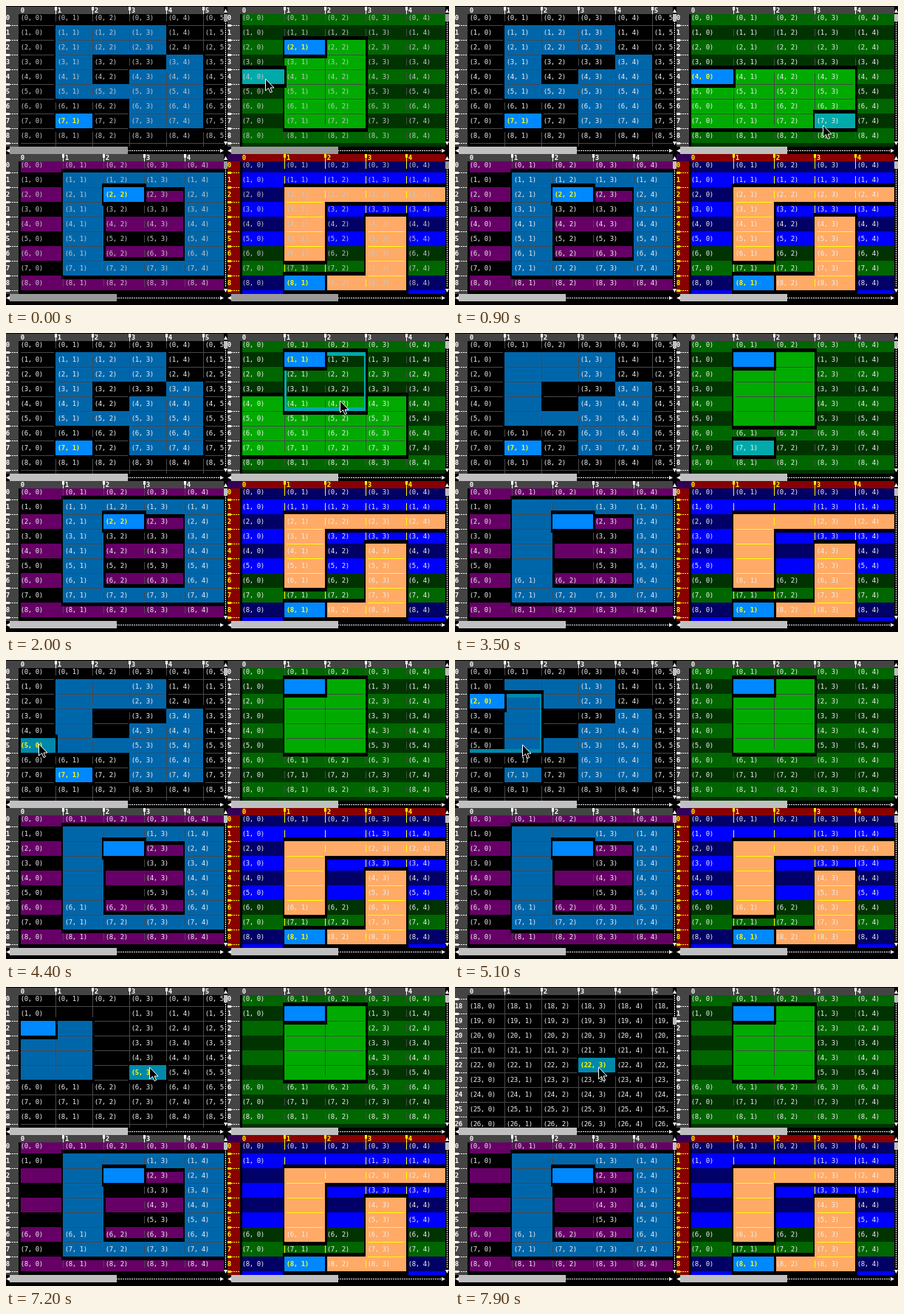
An HTML page with a canvas for the animation above (8000 ms loop, 600 by 406 pixels).

```html
<!DOCTYPE html>
<html lang="en">
<head>
<meta charset="utf-8">
<title>Four tables</title>
<style>
  html, body { margin: 0; width: 100%; height: 100%; overflow: hidden; background: #000; }
  canvas { display: block; width: 600px; height: 406px; }
</style>
</head>
<body>
<canvas id="stage" width="600" height="406"></canvas>
<script>
const g = document.getElementById('stage').getContext('2d');
const LOOP = 8000, STEP = 100;
const FONT = '9px "DejaVu Sans Mono", monospace';
const WHITE = '#fff', YELLOW = '#ffff00', CURRENT = '#0088ff';

const between = (v, lo, hi) => v >= lo && v <= hi;
const block = (a, b) => (r, c) => between(r, a[0], b[0]) && between(c, a[1], b[1]);
const alternate = (even, odd) => r => r % 2 ? odd : even;

// Mouse moves: start, end, goal
const moves = [
  [100, 200, 350, 97], [300, 700, 498, 162], [900, 1700, 402, 37],
  [1700, 2000, 452, 92], [2000, 2300, 487, 140], [2300, 2400, 470, 118],
  [2600, 2600, 400, 156], [4000, 4000, 110, 122], [4000, 4400, 44, 114],
  [4500, 4800, 42, 56], [4900, 5200, 116, 145], [5200, 5300, 109, 119],
  [7000, 7200, 194, 109]
];

function mouseAt(t) {
  let x = 351, y = 99;
  for (const [start, end, goalX, goalY] of moves) {
    if (t < start) break;
    const k = start === end ? 1 : Math.min(1, (t - start) / (end - start));
    x += (goalX - x) * k;
    y += (goalY - y) * k;
  }
  return { x: Math.round(x), y: Math.round(y), shown: t < 2600 || t >= 4000 };
}

// Drags select the block a to b; "cut" empties it in all tables
const gray = { head: '#444', corner: '#444', ink: WHITE, line: '#484848' };
const wide = { first: 60, width: 55, cols: 5, thumb: 145, drags: [] };
const tables = [
  { ...gray, x: 0, y: 1, first: 50, width: 50, cols: 6, thumb: 160,
    row: () => '#000000', selected: '#0066aa', hover: '#0088aa', hoverBold: true,
    current: [7, 1],
    shape: (r, c) => between(r, 1, 7) && between(c, 1, 4) &&
      (r <= 2 && c <= 3 || c === 1 && r !== 6 || r === 5 || c >= 3 && r >= 4 || c === 4 && r === 3),
    drags: [{ press: 5000, release: 5600, a: [2, 0], b: [5, 1], cut: 6400 }] },
  { ...gray, ...wide, x: 300, y: 1,
    row: alternate('#006600', '#003300'), selected: '#00aa00', hover: '#00aaaa',
    current: [2, 1],
    shape: block([2, 1], [7, 2]),
    drags: [{ press: 400, release: 900, a: [4, 0], b: [7, 3] },
            { press: 1800, release: 2600, a: [1, 1], b: [5, 2], cut: 3400 }] },
  { ...gray, ...wide, x: 0, y: 201,
    row: alternate('#660066', '#000000'), selected: '#0066aa',
    current: [2, 2],
    shape: (r, c) => between(r, 1, 7) && c >= 1 && !(between(r, 2, 6) && between(c, 2, 3)) },
  { ...wide, x: 300, y: 201, head: '#880000', corner: '#330055', ink: YELLOW, line: YELLOW,
    row: r => between(r, 6, 7) ? alternate('#003300', '#006600')(r) : alternate('#000066', '#0000ff')(r),
    selected: '#ffaa66',
    current: [8, 1],
    shape: (r, c) => r === 2 && c >= 1 || c === 1 && between(r, 2, 6) ||
      c === 3 && between(r, 4, 8) || r === 8 && between(c, 1, 3) }
];
const cuts = tables.flatMap(tb => tb.drags).filter(d => d.cut);

function rect(color, x, y, w, h) {
  g.fillStyle = color;
  g.fillRect(x, y, w, h);
}

function clipTo(x, y, w, h, draw) {
  g.save();
  g.beginPath();
  g.rect(x, y, w, h);
  g.clip();
  draw();
  g.restore();
}

// Terminal text: one glyph for every 5 by 10 character cell
function text(str, x, y, color, bold) {
  g.font = (bold ? 'bold ' : '') + FONT;
  g.fillStyle = color;
  [...str].forEach((ch, i) => g.fillText(ch, x + i * 5 + 2.5, y + 8));
}

function poly(color, points) {
  g.fillStyle = color;
  g.beginPath();
  points.forEach(p => g.lineTo(...p));
  g.closePath();
  g.fill();
}

const colX = (tb, c) => tb.x + 17 + (c ? tb.first + (c - 1) * tb.width : 0);
const rowY = (tb, r, scroll) => tb.y + 5 + r * 20 - scroll;

function cellUnder(tb, mouse, scroll) {
  const { x, y } = mouse;
  if (!between(x, tb.x + 20, tb.x + 294) || !between(y, tb.y + 10, tb.y + 189)) return null;
  let col = 0;
  while (colX(tb, col + 1) <= x) col++;
  return [Math.floor((y - rowY(tb, 0, scroll)) / 20), col];
}

function drawCells(tb, t, scroll, mouse, ink) {
  const box = (a, b = a) => {
    const x = colX(tb, a[1]), y = rowY(tb, a[0], scroll);
    return [x, y, colX(tb, b[1] + 1) - x, (b[0] - a[0] + 1) * 20];
  };
  const rim = (a, b) => {
    const [x, y, w, h] = box(a, b);
    rect('#000', x - 2, y - 5, w + 5, h + 10);
  };
  const fill = (color, a) => rect(color, ...box(a));

  const pressed = tb.drags.filter(d => t >= d.press).pop();
  const done = tb.drags.filter(d => t >= d.release).pop();
  const dragging = pressed && pressed !== done;
  const current = pressed ? pressed.a : tb.current;
  const chosen = done ? block(done.a, done.b) : tb.shape;
  const color = (r, c) => chosen(r, c) ? tb.selected : tb.row(r);
  const over = cellUnder(tb, mouse, scroll);

  const first = Math.floor(scroll / 20);
  const cells = [];
  for (let r = first; r <= first + 10; r++) {
    rect(tb.row(r), tb.x + 17, rowY(tb, r, scroll), 283, 20);
    for (let c = 0; c < tb.cols; c++) cells.push([r, c]);
  }
  const picked = cells.filter(([r, c]) => chosen(r, c));
  picked.forEach(p => rim(p));
  picked.forEach(p => fill(tb.selected, p));

  // Grid lines run only between cells of one colour
  for (const [r, c] of cells) {
    const [x, y, w] = box([r, c]), own = color(r, c);
    const up = r > 0 && color(r - 1, c) === own;
    const side = c > 0 && color(r, c - 1) === own;
    if (up) rect(tb.line, x + 3, y, w - 5, 1);
    if (side) rect(tb.line, x, y + 5, 1, 10);
    if (up && side && color(r - 1, c - 1) === own) {
      rect(tb.line, x - 2, y, 5, 1);
      rect(tb.line, x, y - 5, 1, 10);
    }
  }

  if (dragging && over) {
    const end = over.map((v, i) => Math.max(v, current[i]));
    const [x, y, w, h] = box(current, end);
    const frame = (shade, fx, fy, fw, fh, l, r) => {
      rect(shade, fx, fy, fw, 5);
      rect(shade, fx, fy + fh - 5, fw, 5);
      rect(shade, fx, fy, l, fh);
      rect(shade, fx + fw - r, fy, r, fh);
    };
    frame('#000', x - 2, y - 5, w + 5, h + 10, 2, 3);
    frame(tb.hover, x, y, w, h, 3, 2);
  }
  rim(current);
  fill(CURRENT, current);
  const hovered = dragging ? null : over;
  if (hovered) {
    rim(hovered);
    fill(tb.hover, hovered);
  }

  for (const [r, c] of cells) {
    if (cuts.some(d => t >= d.cut && block(d.a, d.b)(r, c))) continue;
    const is = p => p && p[0] === r && p[1] === c;
    const bold = is(hovered) ? tb.hoverBold : is(current);
    const [x, y] = box([r, c]);
    text(`(${r}, ${c})`, x + 3, y + 5, bold ? YELLOW : ink, bold);
  }
}

function drawHeaders(tb, scroll) {
  const { x, y } = tb;
  rect(tb.head, x, y, 295, 10);
  rect(tb.corner, x, y, 20, 10);
  for (let c = 0; c < tb.cols; c++) {
    const cx = colX(tb, c);
    text(String(c), cx + 3, y, tb.ink, true);
    if (!c) continue;
    rect(tb.ink, cx - 1, y, 3, 5);
    rect(tb.ink, cx, y + 5, 1, 5);
  }
  clipTo(x, y + 10, 20, 180, () => {
    rect(tb.head, x, y + 10, 17, 180);
    const first = Math.floor(scroll / 20);
    for (let r = first; r <= first + 10; r++) {
      const ry = rowY(tb, r, scroll);
      text(String(r), x, ry + 5, tb.ink, true);
      if (!r) continue;
      rect(tb.ink, x, ry - 1, 5, 3);
      for (let i = 5; i < 15; i += 3) rect(tb.ink, x + i, ry, 2, 1);
    }
  });
}

function drawBars(tb, scroll, thumb) {
  const { x, y } = tb;
  const arrow = (ax, ay, dx, dy) => poly(WHITE, [
    [ax + dx * 2.5, ay + dy * 2.5],
    [ax - dx * 2.5 + dy * 2.5, ay - dy * 2.5 + dx * 2.5],
    [ax - dx * 2.5 - dy * 2.5, ay - dy * 2.5 - dx * 2.5]
  ]);
  rect('#000', x + 295, y, 5, 200);
  rect('#000', x, y + 190, 300, 10);
  for (let i = 10; i < 180; i += 3) rect(WHITE, x + 297, y + i, 1, 2);
  for (let i = 5; i < 290; i += 3) rect(WHITE, x + i, y + 195, 2, 1);
  arrow(x + 297.5, y + 5.5, 0, -1);
  arrow(x + 297.5, y + 185.5, 0, 1);
  arrow(x + 2.5, y + 195.5, -1, 0);
  arrow(x + 292.5, y + 195.5, 1, 0);
  rect(thumb, x + 295, y + 10 + Math.round(scroll * 30 / 350), 5, 10);
  rect(thumb, x + 5, y + 190, tb.thumb, 10);
}

function drawMouse({ x, y }) {
  const shape = [[0, 0], [0, 16], [4, 12.5], [6.5, 18.5], [9, 17.5], [6.5, 12], [11.5, 12]];
  poly('#000', shape.map(([a, b]) => [x + a + 0.5, y + b]));
  g.strokeStyle = WHITE;
  g.lineWidth = 1;
  g.stroke();
}

function draw(time) {
  const t = Math.floor(time / STEP) * STEP;
  const mouse = mouseAt(t);
  const dim = t < 400;
  rect('#000', 0, 0, 600, 406);
  g.textAlign = 'center';
  tables.forEach((tb, i) => {
    // The first table ends with a wheel turn of 70 px per step
    const scroll = i ? 0 : Math.max(0, (t - 7400) / STEP * 70);
    clipTo(tb.x + 20, tb.y + 10, 275, 180,
      () => drawCells(tb, t, scroll, mouse, dim ? '#c8c8c8' : '#f0f0f0'));
    drawHeaders(tb, scroll);
    drawBars(tb, scroll, dim ? '#999' : '#c0c0c0');
  });
  if (mouse.shown) drawMouse(mouse);
}

const start = performance.now();
function tick() {
  draw((performance.now() - start) % LOOP);
  requestAnimationFrame(tick);
}
tick();
</script>
</body>
</html>
```
